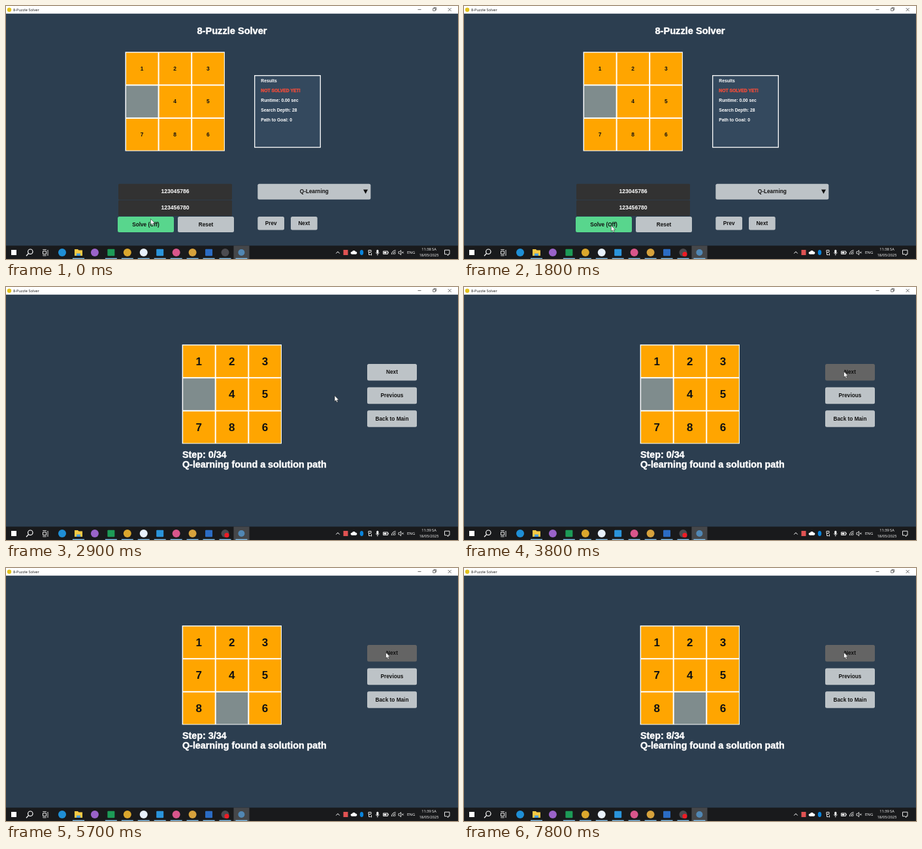
An HTML page for the animation above (8000 ms loop, 692 px wide and 388 px high).

```html
<!DOCTYPE html>
<html lang="en">
<head>
<meta charset="utf-8">
<title>8-Puzzle Solver</title>
<style>
  html, body { margin: 0; width: 100%; height: 100%; overflow: hidden; background: #2c3e50; }
  svg { display: block; width: 692px; height: 388px; }
  text { font-family: "Liberation Sans", Arial, sans-serif; font-weight: bold; white-space: pre; }
  .ui { font-family: "Open Sans", "Noto Sans", sans-serif; font-weight: normal; }
  .heavy { stroke: currentColor; stroke-width: .45; }
  .line { fill: none; stroke: #fff; stroke-width: 1; }
</style>
</head>
<body>
<svg id="stage" viewBox="0 0 692 388"></svg>
<script>
const LOOP = 8000, TICK = 100;
const SOLVE_AT = 1900, RECORD_AT = 100, MINUTE_AT = 2800;
const stage = document.getElementById('stage');

function add(parent, tag, attrs, content) {
  const node = document.createElementNS('http://www.w3.org/2000/svg', tag);
  for (const key in attrs) node.setAttribute(key, attrs[key]);
  if (content !== undefined) node.textContent = content;
  parent.appendChild(node);
  return node;
}
const group = () => add(stage, 'g', {});
const rect = (p, x, y, width, height, fill, rx = 0) =>
  add(p, 'rect', { x, y, width, height, fill, rx });
const disc = (p, cx, cy, r, fill) => add(p, 'circle', { cx, cy, r, fill });
const line = (p, d, attrs) => add(p, 'path', { d, class: 'line', ...attrs });

// Text is centred vertically on y.
function label(p, str, x, y, size, fill, attrs) {
  return add(p, 'text', { x, y: y + size * .355, 'font-size': size, fill, ...attrs }, str);
}
const centred = (p, str, x, y, size, fill, attrs) =>
  label(p, str, x, y, size, fill, { 'text-anchor': 'middle', ...attrs });
const heavy = { class: 'heavy', color: '#fff' };

function button(p, str, x, y, w, h, fill = '#bdc3c7') {
  const face = rect(p, x, y, w, h, fill, 2.5);
  centred(p, str, x + w / 2, y + h / 2 - .4, 8.25, '#111');
  return face;
}

function board(p, x, y, size) {
  rect(p, x, y, 152.4, 152.2, '#fff');
  const cells = Array.from({ length: 9 }, (_, i) => {
    const cx = x + 1.5 + (i % 3) * 50.6, cy = y + 1.4 + Math.floor(i / 3) * 50.6;
    return {
      face: rect(p, cx, cy, 48.6, 48.6, '#ffa500'),
      digit: centred(p, '', cx + 24.1, cy + 24.2, size, '#111'),
    };
  });
  return state => cells.forEach(({ face, digit }, i) => {
    const empty = state[i] === '0';
    face.setAttribute('fill', empty ? '#7f8c8d' : '#ffa500');
    digit.textContent = empty ? '' : state[i];
  });
}

// Input view
const setup = group();
centred(setup, '8-Puzzle Solver', 346, 38, 14.6, '#fff', heavy);
board(setup, 182.5, 70.3, 8.4)('123045786');
add(setup, 'rect', { x: 380.7, y: 106.7, width: 100.6, height: 110, fill: '#34495e', stroke: '#fff', 'stroke-width': 1.3 });
['Results', 'NOT SOLVED YET!', 'Runtime: 0.00 sec', 'Search Depth: 28', 'Path to Goal: 0'].forEach((str, i) => {
  const color = i === 1 ? '#e74c3c' : '#fff';
  label(setup, str, 390.3, 114.5 + i * 15.1, 6.75, color,
    i === 1 ? { class: 'heavy', color } : {});
});
rect(setup, 172, 272.7, 174, 24.3, '#323232', 1.5);
rect(setup, 172, 297.8, 174, 24.3, '#323232', 1.5);
centred(setup, '123045786', 259, 284.3, 8.6, '#fff');
centred(setup, '123456780', 259, 309.3, 8.6, '#fff');
button(setup, 'Solve (Off)', 171, 323, 86, 24, '#58d68d');
button(setup, 'Reset', 263, 323, 86, 24);
button(setup, 'Q-Learning', 385.3, 272.8, 173, 24);
add(setup, 'path', { d: 'M547 281.5h7l-3.5 6.5z', fill: '#111' });
button(setup, 'Prev', 385.3, 323, 40.7, 20.6);
button(setup, 'Next', 436, 323, 40.7, 20.6);

// Solution view
const solution = group();
const showBoard = board(solution, 269.6, 88.2, 17);
const stepText = label(solution, '', 270, 256.6, 14.3, '#fff', heavy);
label(solution, 'Q-learning found a solution path', 270, 271.8, 14.3, '#fff', heavy);
const nextFace = button(solution, 'Next', 553, 118, 76, 25.5);
button(solution, 'Previous', 553, 153.8, 76, 25.5);
button(solution, 'Back to Main', 553, 189.3, 76, 25.5);

// Title bar
const chrome = group();
rect(chrome, 0, 0, 692, 11.7, '#fff');
disc(chrome, 5, 5.8, 3.2, '#e3c21c');
label(chrome, '8-Puzzle Solver', 11, 5.8, 5.7, '#111', { class: 'ui' });
line(chrome, 'M630.5 5.5h5M653.7 3.7h3.6v3.6h-3.6zM655 3.7v-1.2h3.6v3.6h-1.3M676.7 3l5 5m0-5l-5 5',
  { style: 'stroke:#333;stroke-width:.7' });

// Taskbar
rect(chrome, 0, 367.5, 692, 20.5, '#191a1c');
rect(chrome, 348.5, 367.5, 24, 20.5, '#45474a');
rect(chrome, 8, 374, 8, 8, '#fff');
add(chrome, 'circle', { cx: 37.3, cy: 376.7, r: 3.7, class: 'line', style: 'stroke-width:1.2' });
line(chrome, 'M34.6 379.4l-3.6 3.8', { style: 'stroke-width:1.3' });
line(chrome, 'M56.5 376h5v4.5h-5zM56.5 374v-.3h5v.3M56.5 382.5v.3h5v-.3M64 374v9', { style: 'stroke-width:.9' });

const apps = [
  ['disc', '#1f8fd6'], ['folder', '#f6c945'], ['disc', '#9a63c9'], ['box', '#1d9b57'],
  ['disc', '#dba72d'], ['disc', '#e8f1fc'], ['box', '#2a94db'], ['disc', '#d9568c'],
  ['disc', '#d7a23c'], ['box', '#2b6cc4'], ['disc', '#4b4b50'], ['disc', '#5187b4'],
];
apps.forEach(([shape, color], i) => {
  const x = 86 + i * 24.95;
  if (shape === 'disc') disc(chrome, x, 378, i === 11 ? 5 : 6, color);
  else if (shape === 'box') rect(chrome, x - 5.5, 372.7, 11, 10.6, color, 1);
  else {
    add(chrome, 'path', { d: `M${x - 6} 373h5l1.5 1.5h5.5v8.5h-12z`, fill: color });
    rect(chrome, x - 3, 379.5, 6, 3.5, '#4a9fe0');
  }
  if (i !== 0 && i !== 2) rect(chrome, x - 9, 386.6, 18, 1.4, '#83bfe9');
});
const recording = disc(chrome, 338, 380.7, 3.6, '#ee1c25');

// Tray
line(chrome, 'M505.3 379.5l2.7-2.8 2.7 2.8');
rect(chrome, 516.5, 374, 7, 8, '#e05252');
add(chrome, 'path', { d: 'M529.5 380.7a2 2 0 0 1 .3-4 3 3 0 0 1 5.2-.3 2.2 2.2 0 0 1 .8 4.3z', fill: '#fff' });
add(chrome, 'ellipse', { cx: 544.5, cy: 378, rx: 2.7, ry: 4, fill: '#0a84dc' });
line(chrome, 'M555 374.5h4v3h-4zM555.5 377.5v4h3M559.5 379v3.5', { style: 'stroke-width:.9' });
rect(chrome, 567.3, 373.7, 3, 5.5, '#fff', 1.5);
line(chrome, 'M566 378.2q2.8 4 5.6 0M568.8 380.2v2.3', { style: 'stroke-width:.8' });
line(chrome, 'M577.5 376h7v4.4h-7zM585.3 377.3v1.8', { style: 'stroke-width:.9' });
rect(chrome, 578.5, 377, 4, 2.5, '#fff');
line(chrome, 'M590.3 381a6.3 6.3 0 0 1 6.3-6.3M592.6 381a4 4 0 0 1 4-4M594.8 381a1.8 1.8 0 0 1 1.8-1.8', { style: 'stroke-width:.9' });
line(chrome, 'M601 376.7h1.4l2.2-2v7l-2.2-2h-1.4zM606 376.7l2.7 2.7m0-2.7l-2.7 2.7', { style: 'stroke-width:.8' });
centred(chrome, 'ENG', 620.2, 378, 6.1, '#fff', { class: 'ui' });
const clock = centred(chrome, '', 647.5, 373.4, 5.7, '#fff', { class: 'ui' });
centred(chrome, '18/05/2025', 647.5, 382.3, 5.6, '#fff', { class: 'ui' });
line(chrome, 'M671.5 374.3h7.5v6.4h-2.2v2l-2-2h-3.3z', { style: 'stroke-width:.9' });

const pointer = add(stage, 'path', {
  d: 'M0 0v9l2-1.8 1.5 3.2 1.5-.7-1.4-3h2.8z',
  fill: '#fff', stroke: '#111', 'stroke-width': .5,
});

// [from, to, x, y]: each leg starts where the previous one ended.
const legs = [
  [0, 0, 221.5, 326.5],
  [1100, 1600, 225.3, 336.5],
  [2400, 3100, 571.8, 124.5],
  [3400, 3800, 581.5, 129.5],
];
// [time, board] for every press of Next; a blocked move keeps the board.
const steps = [
  [0, '123045786'], [4600, '123745086'], [5300, '123745086'], [5700, '123745806'],
  [6000, '123745806'], [6400, '123745860'], [6900, '123745860'], [7300, '123745860'],
  [7800, '123745806'],
];

function pointerAt(t) {
  let x = 0, y = 0;
  for (const [from, to, tx, ty] of legs) {
    if (t < from) break;
    const k = to > from ? Math.min(1, (t - from) / (to - from)) : 1;
    const ease = k * k * (3 - 2 * k);
    x += (tx - x) * ease;
    y += (ty - y) * ease;
  }
  return [x, y];
}

const show = (node, visible) => { node.style.display = visible ? '' : 'none'; };

function render(now) {
  const t = Math.floor(now % LOOP / TICK) * TICK;
  show(setup, t < SOLVE_AT);
  show(solution, t >= SOLVE_AT);
  show(recording, t >= RECORD_AT);
  clock.textContent = t < MINUTE_AT ? '11:38 SA' : '11:39 SA';

  const step = steps.filter(([at]) => at <= t).length - 1;
  showBoard(steps[step][1]);
  stepText.textContent = `Step: ${step}/34`;

  const [x, y] = pointerAt(t);
  pointer.setAttribute('transform', `translate(${x} ${y})`);
  const hover = x >= 553 && x <= 629 && y >= 118 && y <= 143.5;
  nextFace.setAttribute('fill', hover ? '#646464' : '#bdc3c7');
}

const start = performance.now();
function loop() {
  render(performance.now() - start);
  requestAnimationFrame(loop);
}
loop();
</script>
</body>
</html>
```
